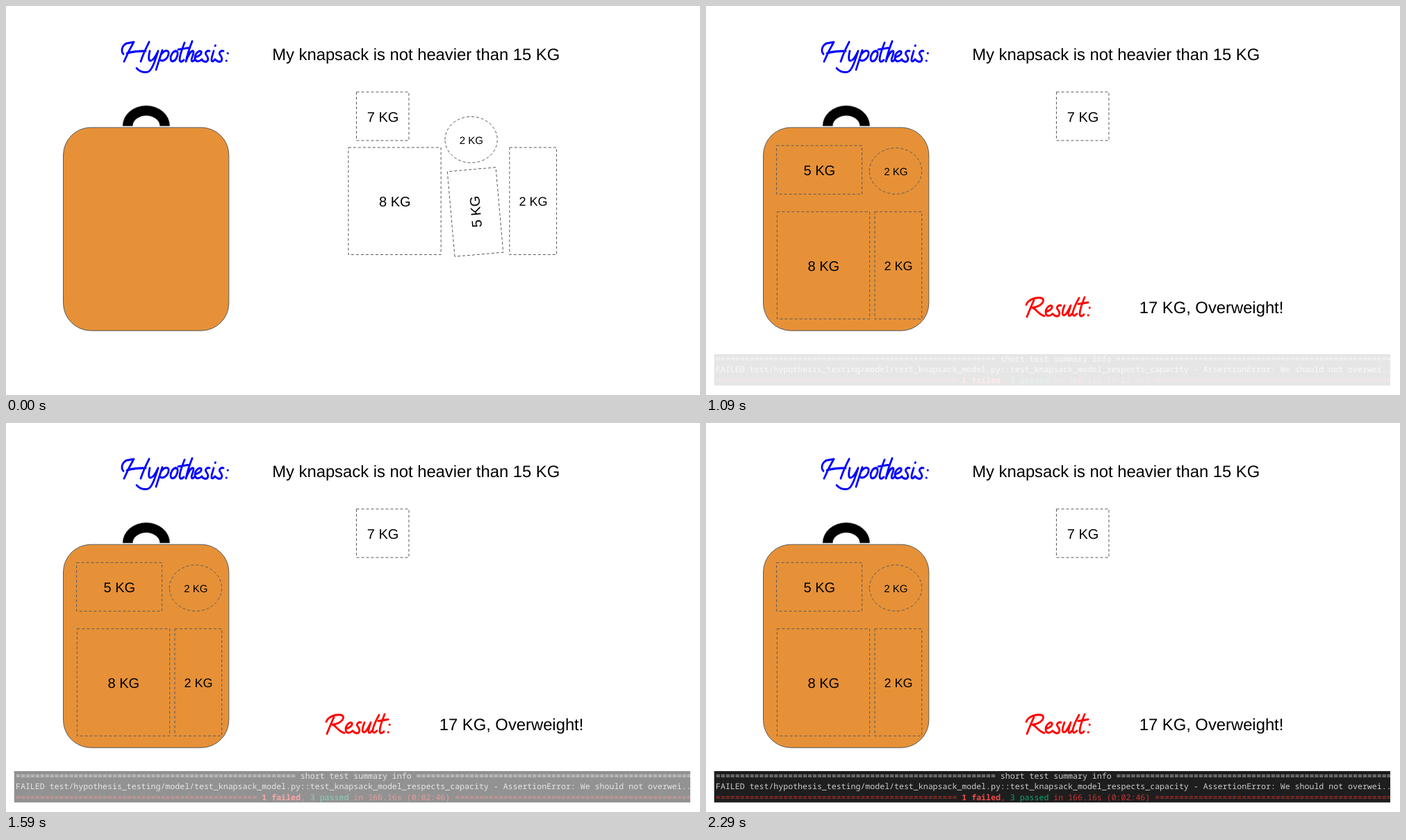
Write an HTML page that moves like this. It is 999 px wide and 561 px high and loops after 2340 ms.

```html
<!DOCTYPE html>
<html lang="en">
<head>
<meta charset="utf-8">
<title>Knapsack hypothesis</title>
<style>
html, body { margin: 0; width: 100%; height: 100%; overflow: hidden; background: #fff; }
svg { display: block; width: 999px; height: 561px; }
text { font-family: "Liberation Sans", Arial, sans-serif; text-rendering: geometricPrecision; }
.line { font-size: 23.8px; }
.item text { text-anchor: middle; }
.item rect, .item ellipse { fill: none; stroke: #595959; stroke-dasharray: 4 3; }
.script { fill: none; stroke-width: 2.8; stroke-linecap: round; stroke-linejoin: round; }
#log text { font: 11.59px "Noto Sans Mono", "DejaVu Sans Mono", monospace; fill: #ccc; white-space: pre; }
#log .red { fill: #cd3131; }
#log .fail { fill: #f14c4c; font-weight: bold; }
#log .pass { fill: #0fa56c; }
</style>
</head>
<body>
<svg viewBox="0 0 999 561">
  <defs><clipPath id="edge"><rect x="11.5" y="502" width="973.5" height="45.5"/></clipPath></defs>
  <g id="title" class="script" stroke="#00f" role="img" aria-label="Hypothesis:"></g>
  <text class="line" x="383.2" y="78">My knapsack is not heavier than 15 KG</text>
  <path d="M168 173A33.85 29.3 0 0 1 235.7 173H221.5A19.6 15 0 0 0 182.3 173Z" stroke="#595959" stroke-width=".6"/>
  <rect x="82.5" y="175.2" width="238.3" height="293" rx="39.8" fill="#e69138" stroke="#595959"/>
  <g id="fixed"></g>
  <g id="loose"></g>
  <g id="packed"></g>
  <g id="result">
    <g id="verdict" class="script" stroke="#f00" role="img" aria-label="Result:"></g>
    <text class="line" x="623.7" y="442.5">17 KG, Overweight!</text>
  </g>
  <g id="log" clip-path="url(#edge)">
    <rect x="11.5" y="502" width="973.5" height="45.5" fill="#1e1e1e"/>
    <text x="14" y="512.8" id="head"></text>
    <text x="14" y="528.3">FAILED test/hypothesis_testing/model/test_knapsack_model.py::test_knapsack_model_respects_capacity - AssertionError: We should not overwei...</text>
    <text x="14" y="543.7" class="red" id="foot"></text>
  </g>
</svg>
<script>
const $ = id => document.getElementById(id);

// Pen strokes, origin at the left end of the baseline
const glyphs = {
  H: 'M4-10C0-14 2-21 8-24L19-26C14-18 9-9 5 0M9-11C17-13 26-14 36-14M41-26C36-17 32-9 29 0',
  y: 'M2-14C0-6 0-1 3-1C7-1 11-8 14-14C10-2 5 13-1 14C-6 15-12 14-17 9',
  p: 'M5-15L-4 11M3-9C8-16 15-16 14-10C13-4 6 1 2-2',
  o: 'M8-14C3-14 0-8 0-4C0 1 5 1 8-4C11-9 11-14 7-14',
  t: 'M8-25C5-18 1-8 1-3C1 1 4 1 7-2M-1-16L13-18',
  h: 'M9-27C6-20 2-9 0 0C3-8 7-14 10-14C13-13 8-5 8-2C8 1 11 0 13-3',
  e: 'M1-6C6-7 10-10 9-13C7-16 0-11 0-5C0 1 6 1 10-3',
  s: 'M9-14C5-15 2-12 4-9C7-6 8-2 5 0C2 1 0 0-2-2',
  i: 'M4-14C2-8 0-3 1-1C2 1 4-1 6-3M6-21l.5-.5',
  u: 'M3-14C0-7-1-1 2-1C6-1 9-8 12-14C10-8 8-2 9-1C10 1 12-1 14-3',
  l: 'M10-24C6-17 0-7 1-2C2 1 5-1 7-3',
  R: 'M12-21C8-13 5-6 2 1M1-15C4-22 14-25 22-24C30-22 24-13 10-11C16-9 18-2 27 0',
  ':': 'M2-11h.4M0-1h.4'
};

function script(id, word, xs, y) {
  $(id).innerHTML = [...word].map((c, i) =>
    `<path d="${glyphs[c]}" transform="translate(${xs[i]} ${y}) scale(1 1.08)"/>`).join('');
}

function item(kg, x, y, w, h, size, turn = 0, round = false) {
  const shape = round
    ? `<ellipse rx="${w / 2}" ry="${h / 2}" transform="rotate(180)"/>`
    : `<rect x="${-w / 2}" y="${-h / 2}" width="${w}" height="${h}"/>`;
  return `<g class="item" transform="translate(${x} ${y}) rotate(${turn})">${shape}` +
    `<text x=".3" y="${size * .38}" font-size="${size}">${kg} KG</text></g>`;
}

const load = (big, tall, slim, ball) =>
  item(8, ...big, 133.3, 154.5, 20) +
  item(5, ...tall.slice(0, 2), 123, 70, 20, tall[2]) +
  item(2, ...slim, 67.7, 154.5, 18) +
  item(2, ...ball, 75.3, 66.5, 15, 0, true);

script('title', 'Hypothesis:', [165, 205, 220, 237, 249, 259, 272, 284, 295, 304, 317], 80);
script('verdict', 'Result:', [460, 489, 502, 513, 527, 537, 550], 447);
$('fixed').innerHTML = item(7, 542.2, 159, 75.5, 70, 20);
$('loose').innerHTML = load([559.5, 281.3], [675.5, 297, -95], [758.7, 281.3], [669.6, 192.8]);
$('packed').innerHTML = load([169, 374], [163, 236.3, 0], [276.8, 374], [273, 238]);

const rule = n => '='.repeat(n);
$('head').textContent = `${rule(58)} short test summary info ${rule(58)}`;
$('foot').innerHTML = `${rule(50)} <tspan class="fail">1 failed</tspan>, ` +
  `<tspan class="pass">3 passed</tspan> in 166.16s (0:02:46) ${rule(50)}`;

const LOOP = 2340;
const start = performance.now();

function draw(now) {
  const t = Math.max(0, now - start) % LOOP;
  const mix = Math.min(5, Math.max(0, Math.floor((t - 260) / 90) + 1)) / 5;
  const step = Math.floor((t - 1090) / 100);
  $('loose').setAttribute('opacity', 1 - mix);
  $('packed').setAttribute('opacity', mix);
  $('result').setAttribute('opacity', t < 860 ? 0 : 1);
  $('log').setAttribute('opacity', step < 0 ? 0 : .11 + .89 * step / 12);
  requestAnimationFrame(draw);
}
draw(start);
</script>
</body>
</html>
```
